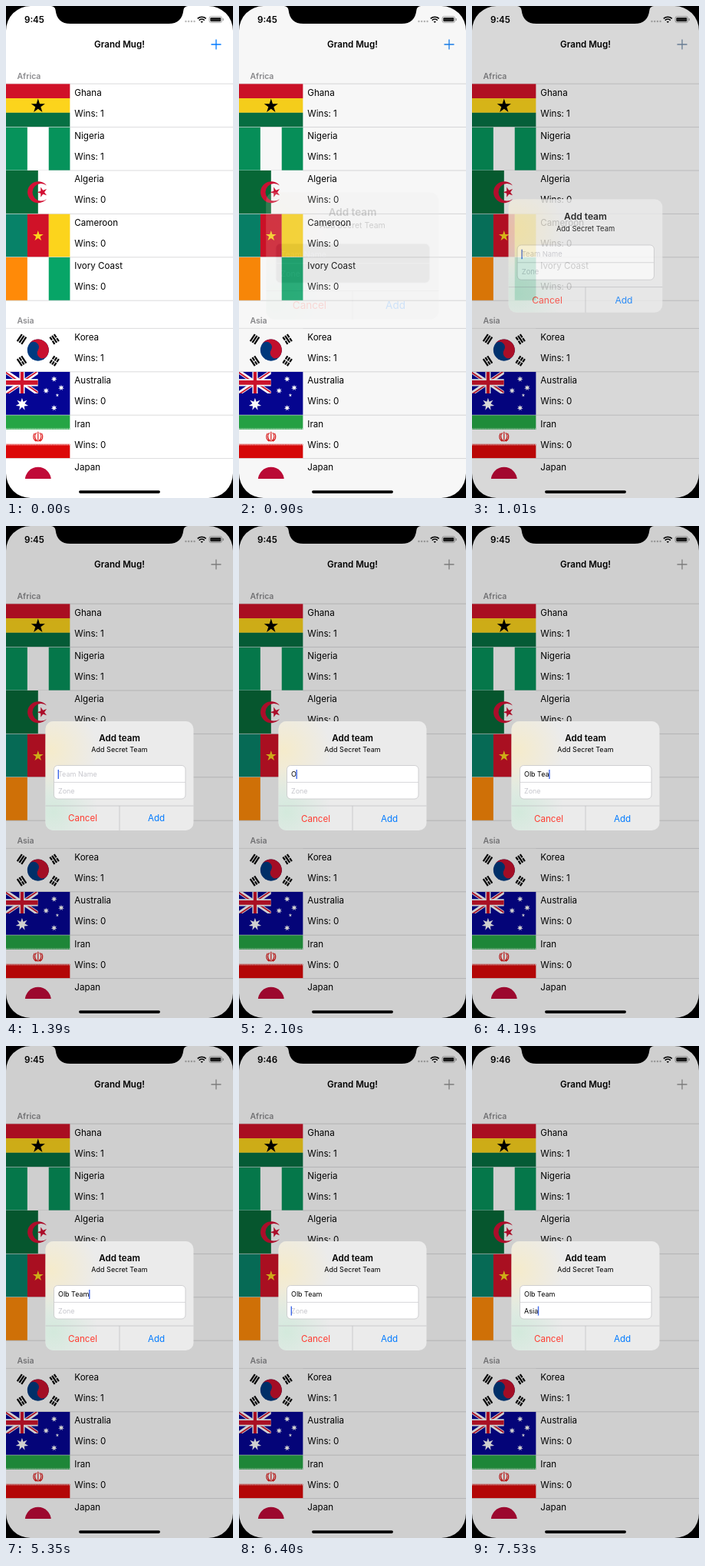
An HTML page for the animation above (8000 ms loop, 296 by 640 pixels).

```html
<!DOCTYPE html>
<html lang="en">
<head>
<meta charset="utf-8">
<title>Team list</title>
<style>
  html, body { margin: 0; width: 100%; height: 100%; overflow: hidden; background: #000; }
  svg { display: block; }
  text { font-family: Inter, Roboto, sans-serif; font-size: 11.6px; white-space: pre; }
  .bold { font-weight: 600; }
  .mid { text-anchor: middle; }
  .small { font-size: 9px; }
  .zone { font-size: 10.5px; font-weight: 600; fill: #8b8b8e; }
  .hint { fill: #c7c7cd; }
</style>
</head>
<body>
<svg id="stage" width="296" height="640" viewBox="0 0 296 640"></svg>
<script>
const ROW = 56.4, FLAG = 83.6, MID = FLAG / 2, HALF = ROW / 2;

const rect = (x, y, w, h, fill, more = '') =>
  `<rect x="${x}" y="${y}" width="${w}" height="${h}" fill="${fill}" ${more}/>`;
const disc = (x, y, r, fill) => `<circle cx="${x}" cy="${y}" r="${r}" fill="${fill}"/>`;
const line = (d, color, width, more = '') =>
  `<path d="${d}" fill="none" stroke="${color}" stroke-width="${width}" ${more}/>`;
const text = (x, y, str, cls = '', more = '') =>
  `<text x="${x}" y="${y}" class="${cls}" ${more}>${str}</text>`;

function star(x, y, r, fill, points = 5, inner = 0.382, turn = 0) {
  const pts = [];
  for (let i = 0; i < points * 2; i++) {
    const a = i * Math.PI / points + turn, d = i % 2 ? r * inner : r;
    pts.push((x + d * Math.sin(a)).toFixed(2) + ',' + (y - d * Math.cos(a)).toFixed(2));
  }
  return `<polygon points="${pts.join(' ')}" fill="${fill}"/>`;
}

const columns = colors => colors.map((c, i) =>
  rect(i * FLAG / 3, 0, FLAG / 3 + 0.1, ROW, c)).join('');
const bands = colors => colors.map((c, i) =>
  rect(0, i * ROW / 3, FLAG, ROW / 3 + 0.1, c)).join('');

// bits: 1 is a solid bar, 0 a split one, from the outside in
function trigram(sx, sy, bits) {
  const turn = Math.atan2(sy * 14.2, sx * 21.3) * 180 / Math.PI;
  const bars = [...bits].map((b, i) => {
    const x = 3.3 - i * 3.3;
    return line(`M${x} -5.5V${b === '1' ? 5.5 : -0.6}` + (b === '1' ? '' : `M${x} .6V5.5`), '#000', 2.2);
  }).join('');
  return `<g transform="translate(${MID + sx * 21.3} ${HALF + sy * 14.2}) rotate(${turn})">${bars}</g>`;
}

function korea() {
  return rect(0, 0, FLAG, ROW, '#fff') +
    `<g transform="translate(${MID} ${HALF}) rotate(33.7)">` + disc(0, 0, 14, '#003a80') +
    '<path d="M-14 0A14 14 0 0 1 14 0A7 7 0 0 1 0 0A7 7 0 0 0 -14 0Z" fill="#c8102e"/></g>' +
    trigram(-1, -1, '111') + trigram(1, -1, '010') + trigram(-1, 1, '101') + trigram(1, 1, '000');
}

function australia() {
  const diagonals = 'M0 0L60 30M60 0L0 30', cross = 'M30 0V30M0 15H60';
  const jack = `<svg width="${MID}" height="${HALF}" viewBox="0 0 60 30" preserveAspectRatio="none">
    <clipPath id="saltire"><path d="M30 15h30v15zv15H0zH0V0zV0h30z"/></clipPath>` +
    line(diagonals, '#fff', 6) + line(diagonals, '#d0142c', 4, 'clip-path="url(#saltire)"') +
    line(cross, '#fff', 10) + line(cross, '#d0142c', 6) + '</svg>';
  const stars = [[.25, .75, 8.4], [.75, .833, 4], [.625, .437, 4], [.75, .167, 4], [.861, .369, 4]];
  return rect(0, 0, FLAG, ROW, '#050594') + jack +
    stars.map(([x, y, r]) => star(x * FLAG, y * ROW, r, '#fff', 7, 0.44)).join('') +
    star(.8 * FLAG, .54 * ROW, 2.4, '#fff');
}

function iran() {
  const fringe = y => line(`M0 ${y}H${FLAG}`, '#fff', 1.6, 'stroke-dasharray="1.2 .9" opacity=".75"');
  return bands(['#25a545', '#fff', '#dc0808']) + fringe(17.8) + fringe(38.6) +
    line(`M${MID} 21.5V34.5M39.6 23C36.8 26 37 31 40.6 33.5M44 23C46.8 26 46.6 31 43 33.5` +
      'M37.2 23.5C34.4 28 36 32.5 39.6 34M46.4 23.5C49.2 28 47.6 32.5 44 34', '#dc0808', 1.1);
}

const africa = [
  ['Ghana', 1, bands(['#d01228', '#fcd41c', '#067043']) + star(MID, 29, 9.6, '#000')],
  ['Nigeria', 1, columns(['#06935b', '#fff', '#06935b'])],
  ['Algeria', 0, rect(0, 0, FLAG, ROW, '#fff') + rect(0, 0, MID, ROW, '#076a38') +
    `<path d="M53 19.5A14 14 0 1 0 53 36.9A11.3 11.3 0 1 1 53 19.5Z" fill="#d21034"/>` +
    star(47.4, HALF, 7, '#d21034', 5, 0.382, -Math.PI / 2)],
  ['Cameroon', 0, columns(['#078268', '#d01228', '#fcd41c']) + star(MID, HALF + .6, 7.3, '#fcd41c')],
  ['Ivory Coast', 0, columns(['#ff8a08', '#fff', '#07a567'])]
];
const asia = [
  ['Korea', 1, korea()],
  ['Australia', 0, australia()],
  ['Iran', 0, iran()],
  ['Japan', 0, rect(0, 0, FLAG, ROW, '#fff') + disc(MID, HALF, 17, '#c00a38')]
];

function section(name, y, rows) {
  const rule = y => line(`M0 ${y}H296`, '#d2d2d5', 0.8);
  return text(14.5, y - 6.2, name, 'zone') + rows.map(([team, wins, flag], i) => {
    const top = y + i * ROW;
    return rule(top) + `<svg y="${top}" width="${FLAG}" height="${ROW}">${flag}</svg>` +
      text(89.3, top + 15.4, team) + text(89.3, top + 42.4, 'Wins: ' + wins);
  }).join('') + rule(y + rows.length * ROW);
}

const statusBar = text(24, 21.6, '', 'bold', 'id="clock"') +
  [0, 1, 2, 3].map(i => disc(234.5 + i * 3.7, 20, 1.2, '#b8b8b8')).join('') +
  line('M249.8 16.4a8 8 0 0 1 11 0M251.8 18.6a5 5 0 0 1 7 0', '#000', 1.6) +
  '<path d="M253.6 20.3q1.7-1.3 3.4 0l-1.7 1.7z"/>' +
  rect(265, 13.6, 16.6, 8, 'none', 'rx="2.4" stroke="#999" stroke-width=".8"') +
  rect(266.3, 14.9, 14, 5.4, '#222', 'rx="1.3"') + rect(282.6, 16, 1.2, 3.2, '#999', 'rx=".6"');

const alertBox = `<g id="alert">
  <clipPath id="card"><rect x="51.5" y="254" width="193" height="142" rx="10"/></clipPath>
  <g clip-path="url(#card)">` +
  rect(51, 254, 194, 142, '#ebebeb') +
  rect(51, 254, 194, 142, 'url(#warm)') + rect(51, 254, 194, 142, 'url(#mint)') + '</g>' +
  text(148, 280.2, 'Add team', 'bold mid') + text(148, 294.3, 'Add Secret Team', 'small mid') +
  rect(62.5, 311.5, 171.5, 43.5, '#fff', 'id="fields" rx="5" stroke="#c6c6c8" stroke-width=".8"') +
  line('M62.5 333.4H234', '#cfcfd1', 0.8) +
  text(68, 326.3, '', 'small', 'id="team"') + text(68, 347.9, '', 'small', 'id="region"') +
  rect(0, 0, 1.4, 12, '#4068e8', 'id="caret"') +
  line('M51.5 364H244.5M148 364V396', '#c2c2c4', 0.8) +
  text(100, 384.5, 'Cancel', 'mid', 'fill="#ff3b30"') + text(196, 384.5, 'Add', 'mid', 'fill="#007aff"') +
  '</g>';

const glow = (id, x, y, r, color) =>
  `<radialGradient id="${id}" gradientUnits="userSpaceOnUse" cx="${x}" cy="${y}" r="${r}">
    <stop stop-color="${color}"/><stop offset="1" stop-color="${color}" stop-opacity="0"/></radialGradient>`;

document.getElementById('stage').innerHTML =
  glow('warm', 58, 292, 62, '#f5ebcb') + glow('mint', 62, 372, 58, '#d3e9dc') +
  rect(0, 0, 296, 640, '#fff') +
  `<svg width="296" height="615">${section('Africa', 101.2, africa)}${section('Asia', 419.4, asia)}</svg>` +
  text(148, 54.2, 'Grand Mug!', 'bold mid') + line('M274 43.5V56.5M267.5 50H280.5', '#007aff', 1.3, 'id="plus"') +
  statusBar + rect(95, 630.3, 106, 3.6, '#000', 'rx="1.8"') +
  rect(0, 0, 296, 640, '#000', 'id="dim"') + alertBox +
  `<path fill-rule="evenodd" d="M0 0H296V640H0ZM32 0A32 32 0 0 0 0 32V608A32 32 0 0 0 32 640H264A32 32 0 0 0 296 608V32A32 32 0 0 0 264 0Z"/>
  <path d="M57 0C62 0 64 2 64.5 5C66 17 72 23 84 23H212C224 23 230 17 231.5 5C232 2 234 0 239 0Z"/>`;

const el = {};
for (const id of ['clock', 'plus', 'dim', 'alert', 'fields', 'team', 'region', 'caret'])
  el[id] = document.getElementById(id);
const set = (id, name, value) => el[id].setAttribute(name, value);

const TEAM = 'Olb Team', REGION = 'Asia';
// time, letters in the first field, letters in the second, caret opacity
const keys = [
  [0, 0, 0, 1], [1530, 0, 0, 0], [2100, 1, 0, 1], [2330, 2, 0, 1], [2510, 3, 0, 1],
  [3030, 4, 0, 1], [3560, 4, 0, .5], [3680, 4, 0, 0], [3790, 5, 0, 1], [3960, 6, 0, 1],
  [4190, 7, 0, 1], [4360, 8, 0, 1], [4880, 8, 0, .5], [5000, 8, 0, 0], [5230, 8, 0, .5],
  [5350, 8, 0, 1], [5870, 8, 0, .5], [5980, 8, 0, 0], [6080, 8, 0, 1], [6600, 8, 0, .5],
  [6710, 8, 0, 0], [6820, 8, 1, 1], [7230, 8, 2, 1], [7400, 8, 3, 1], [7530, 8, 4, 1]
];

function fill(id, str, hint) {
  el[id].textContent = str || hint;
  el[id].classList.toggle('hint', !str);
  return 68 + (str ? el[id].getComputedTextLength() : 0);
}

function draw(t) {
  // critically damped spring, shown in steps of 110 ms
  const step = 680 + Math.floor((t - 680) / 110) * 110;
  const x = Math.max(0, (step - 865) * 0.0206);
  const p = 1 - (1 + x) * Math.exp(-x);
  const scale = 1.2 - 0.2 * p;
  const mix = (a, b) => Math.round(a + (b - a) * p);

  set('dim', 'opacity', 0.19 * p);
  set('alert', 'opacity', p);
  set('alert', 'transform', `translate(148 325) scale(${scale}) translate(-148 -325)`);
  const shade = Math.round(255 - 165 * (1 - p) ** 3);
  set('fields', 'fill', `rgb(${shade},${shade},${shade})`);
  set('plus', 'stroke', `rgb(${mix(0, 153)},${mix(122, 153)},${mix(255, 153)})`);
  set('plus', 'opacity', t < 500 || t >= 790 ? 1 : t < 680 ? 0.3 : 0.6);
  el.clock.textContent = t < 6400 ? '9:45' : '9:46';

  const [, n, m, on] = keys.findLast(k => k[0] <= t);
  const ends = [fill('team', TEAM.slice(0, n), 'Team Name'), fill('region', REGION.slice(0, m), 'Zone')];
  const row = t < 6080 ? 0 : 1;
  set('caret', 'x', ends[row] - 0.4);
  set('caret', 'y', 317 + row * 21.6);
  set('caret', 'opacity', on);
}

function tick() {
  draw(performance.now() % 8000);
  requestAnimationFrame(tick);
}
tick();
</script>
</body>
</html>
```
